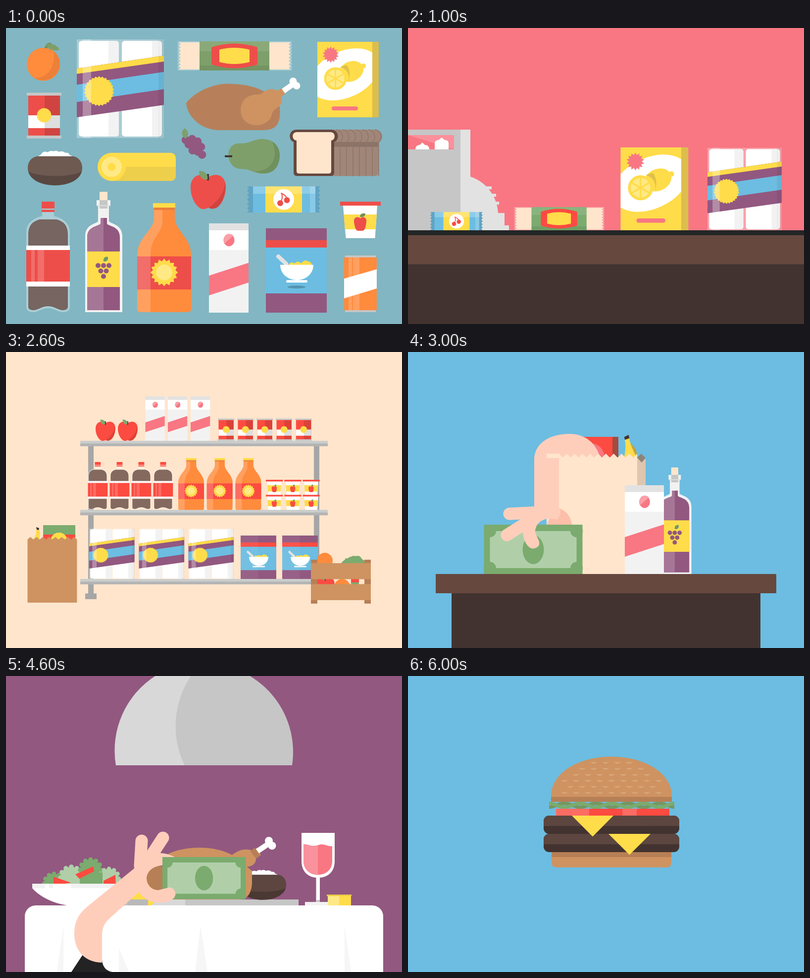
These frames come from a looping animation (800 px wide and 600 px high, 7000 ms). An HTML page:

```html
<!DOCTYPE html>
<html lang="en">
<head>
<meta charset="utf-8">
<style>
html, body { margin: 0; width: 100%; height: 100%; overflow: hidden; }
svg { display: block; width: 800px; height: 600px; }
svg > g { --r: #fc4b41; --g: #7bab6e; --c: #84695f; --p: #5c463f; --t: #ce9361; display: none; }
svg > g:first-child { --r: #ee4e49; --g: #7e9f69; --c: #766560; --p: #6f5a51; --t: #b7805a; }
</style>
</head>
<body>
<svg viewBox="0 0 800 600"></svg>
<script>
const red = 'var(--r)', green = 'var(--g)', white = '#fff', pale = '#f2f2f2', light = '#e2e2e2',
  gray = '#c6c6c6', steel = '#b4b4b4', post = '#a6a6a6', cream = '#ffe5cc', yellow = '#ffdc4a',
  lemon = '#ffe985', orange = '#ff8b3d', purple = '#925880', pink = '#f87783', blue = '#6cbde1',
  tan = '#ce9361', bark = '#b77f55', brown = '#66483f', cocoa = '#5c463f', dark = '#423330',
  skin = '#ffcebb', shade = 'rgba(0,0,0,.13)', glow = 'rgba(255,255,255,.18)', film = 'rgba(255,255,255,.3)';

const rect = (x, y, w, h, f, r = 0) =>
  `<rect x="${x}" y="${y}" width="${w}" height="${h}" rx="${r}" fill="${f}"/>`;
const disc = (x, y, r, f, ry = r, turn = 0) =>
  `<ellipse cx="${x}" cy="${y}" rx="${r}" ry="${ry}" fill="${f}" transform="rotate(${turn} ${x} ${y})"/>`;
const path = (d, f) => `<path d="${d}" fill="${f}"/>`;
const line = (d, c, w, cap = 'round') =>
  `<path d="${d}" fill="none" stroke="${c}" stroke-width="${w}" stroke-linecap="${cap}"/>`;
const list = (n, f) => Array.from({ length: n }, (_, i) => f(i)).join('');
const star = (x, y, R, r, n, f) => path('M' + Array.from({ length: 2 * n }, (_, i) => {
  const a = i * Math.PI / n, q = i % 2 ? r : R;
  return (x + q * Math.sin(a)).toFixed(1) + ' ' + (y - q * Math.cos(a)).toFixed(1);
}).join('L') + 'Z', f);
// Zigzag starting at the current point, n teeth of the given vector plus a notch.
const zig = (n, dx, dy, nx, ny) => list(n, () => `l${dx / 2 + nx} ${dy / 2 + ny}l${dx / 2 - nx} ${dy / 2 - ny}`);
const ruffle = (x, y, R, f) => disc(x, y, R, f) +
  list(12, i => disc(x + R * Math.cos(i * Math.PI / 6), y + R * Math.sin(i * Math.PI / 6), R * .22, f));
const grapes = (x, y, r, dx, dy) => [3, 2, 1].map((n, row) =>
  list(n, i => disc(x + (i - (n - 1) / 2) * dx, y + row * dy, r, purple))).join('');

const appleShape = 'M408 303C395 292 373 298 373 323C373 348 388 367 398 367C404 367 406 365 409 364C412 366 415 367 420 366C432 365 444 345 444 322C444 298 424 292 408 303Z';
const apple = path(appleShape, red) +
  path('M443 312C446 340 432 366 420 366C415 367 412 366 410 364C426 352 440 338 443 312Z', shade) +
  rect(406, 296, 4, 13, dark) + path('M390 290C402 289 409 296 407 307C396 309 390 301 390 290Z', green);

const cereal = (mid, end) => rect(525, 406, 123, end - 406, purple) + rect(525, 430, 123, 15, red) +
  rect(525, 445, 123, mid - 445, blue) +
  disc(587, mid - 13, 18, 'rgba(0,0,0,.22)', 3) +
  line('M550 463L566 478', light, 8) +
  path('M570 481Q575 472 583 477Q590 470 596 477Q604 468 610 473Q617 473 618 481Z', yellow) +
  path('M554 480H621C621 498 606 511 588 511C569 511 554 498 554 480Z', white) +
  rect(566, 511, 43, 5, white, 2.5);

// Each item: left, top, drawing.
const items = {
  orange: [42, 30, disc(75.5, 73.5, 33.5, orange) +
    path('M96 47C101 80 85 100 58 102C82 114 109 97 109 73C109 62 104 53 96 47Z', '#ec8038') +
    path('M78 41C79 33 86 28 92 31C90 38 86 42 78 41Z', '#6f9060') +
    path('M80 34C92 30 104 34 108 44C96 48 86 44 80 34Z', green)],
  towels: [143, 23, rect(143, 23, 176, 200, film) + rect(147, 26, 81, 194, white, 6) +
    path('M207 26H222Q228 26 228 32V214Q228 220 222 220H207Z', pale) +
    rect(234, 26, 81, 194, white, 6) + rect(295, 26, 14, 194, pale) +
    path('M143 82L319 56V156L143 181Z', purple) + path('M143 82L319 56V68L143 93Z', yellow) +
    path('M143 115L319 89V124L143 150Z', blue) + rect(308, 23, 11, 200, 'rgba(0,0,0,.06)') +
    star(188, 128, 30.5, 27.5, 26, yellow) + rect(155, 23, 17, 200, film)],
  wrapper: [346, 27, path('M346 27H578' + zig(9, 0, 6.55, -2, 0) + 'H346' + zig(9, 0, -6.55, 2, 0) + 'Z', film) +
    path('M349 29H575' + zig(8, 0, 6.875, -4, 0) + 'H349' + zig(8, 0, -6.875, 4, 0) + 'Z', cream) +
    rect(391, 27, 141, 59, green) + rect(391, 27, 141, 20, 'rgba(255,255,255,.1)') +
    rect(391, 76, 141, 10, 'rgba(0,0,0,.07)') +
    path('M415 39Q461 24 508 39V74Q461 89 415 74Z', red) +
    path('M431 44Q461 36 492 44V69Q461 77 431 69Z', yellow)],
  lemonBox: [629, 28, rect(629, 28, 111, 153, yellow) + rect(740, 28, 13, 153, '#dcbe4c') +
    '<clipPath id="face"><path d="M629 28h111v153h-111z"/></clipPath><g clip-path="url(#face)">' +
    disc(684, 94, 74, white, 47, -25) + '</g>' +
    disc(697, 88, 26, yellow, 20, -25) + disc(722, 77, 5, yellow) + line('M708 82L720 78', yellow, 9) +
    path('M675 79C694 84 699 106 684 117C698 107 696 84 688 75Z', '#dfc04b') +
    disc(665.5, 102.5, 23, yellow) + disc(665.5, 102.5, 18, lemon) +
    list(3, i => `<g transform="rotate(${i * 60} 665.5 102.5)">${rect(664, 84, 3, 37, yellow)}</g>`) +
    star(656, 54, 16.5, 12, 14, pink) + rect(658, 159, 53, 8, pink, 4)],
  can: [42, 131, rect(45, 137, 64, 81, red) + rect(45, 177, 64, 26, white) + rect(78, 137, 31, 81, shade) +
    rect(42, 131, 70, 6, gray) + rect(42, 218, 70, 6, gray) + disc(77, 177, 14.5, yellow)],
  turkey: [364, 100, path('M364 152C385 125 425 112 450 113C490 114 510 121 532 135L553 160C556 195 545 207 520 207H430C395 207 366 180 364 152Z', 'var(--t)') +
    line('M560 128L584 111', white, 11, 'butt') + disc(580, 108, 7.5, white) + disc(587, 117, 7.5, white) +
    path('M474 167C474 145 490 135 506 135C520 135 522 124 537 124C542 124 546 126 549 127L556 122L564 133L557 139V150C555 160 541 163 538 172C535 190 520 197 506 197C487 197 474 184 474 167Z', tan)],
  grapes: [355, 203, [[363, 227], [376, 225], [387, 230], [369, 236], [381, 238], [394, 241], [377, 248], [388, 251], [396, 257]]
    .map(([x, y]) => disc(x, y, 8.3, purple)).join('') +
    path('M361 203C370 210 370 218 363 224C353 219 354 209 361 203Z', green)],
  pear: [442, 225, path('M450 262C447 240 462 232 476 234C492 234 500 225 518 225C540 225 553 240 553 258C553 280 540 295 518 295C500 295 495 286 478 286C460 286 452 275 450 262Z', green) +
    path('M538 230C552 265 535 290 503 291C540 304 553 280 553 258C553 246 547 236 538 230Z', '#70915f') +
    rect(442, 258, 15, 4, '#413532')],
  bread: [574, 206, path('M655 206H745C764 206 763 230 752 231V293Q752 300 745 300H655Z', '#a08679') +
    rect(660, 231, 92, 10, '#8c7368') +
    list(7, i => line(`M${668 + i * 13} 206c15 3 14 22 7 25V300`, '#907669', 1.6)) +
    path('M587 206H656C674 206 674 228 663 231V293Q663 300 656 300H588Q581 300 581 293V231C570 228 570 206 587 206Z', brown) +
    path('M588 211H655C667 211 666 227 657 228V290Q657 295 652 295H592Q587 295 587 290V228C577 227 576 211 588 211Z', cream)],
  potato: [44, 248, path('M44 284C44 268 55 260 66 260H133C145 260 154 270 154 284C154 305 130 319 99 319C68 319 44 305 44 284Z', 'var(--p)') +
    path('M45 291C70 303 130 303 153 291C149 308 127 319 99 319C71 319 49 308 45 291Z', 'rgba(0,0,0,.2)') +
    path('M65 260C69 257 71 257 74 252Q80 249 84 252Q90 247 96 250Q101 247 107 251Q114 248 120 253Q127 252 128 257L134 260Z', white)],
  roll: [185, 253, path('M213 253H331Q343 253 343 265V298Q343 310 331 310H213Z', yellow) +
    path('M213 281.5H343V298Q343 310 331 310H213Z', '#eecf4c') + disc(213.5, 281.5, 28.5, yellow) +
    disc(213.5, 281.5, 20.5, lemon) + disc(213.5, 281.5, 8, yellow)],
  apple: [373, 290, apple],
  bar: [487, 321, path('M500 321L487 321' + zig(6, 0, 8.83, 4, 0) + 'L500 374Z', '#61a3c3') +
    path('M623 321H635' + zig(6, 0, 8.83, -4, 0) + 'H623Z', '#61a3c3') +
    rect(499, 321, 126, 53, blue) + rect(524, 321, 74, 53, yellow) + rect(499, 321, 126, 15, 'rgba(255,255,255,.22)') +
    rect(614, 321, 11, 53, glow) + disc(561, 347.5, 21, white) +
    line('M556 335C566 339 568 344 568 349M557 336C560 344 557 350 554 355', red, 2) +
    disc(554, 355, 6, red) + disc(567.5, 349, 6, red)],
  yogurt: [675, 352, path('M681 360H750L745.5 426H686.5Z', white) + path('M682.4 378H748.8L746.6 408H684.7Z', yellow) +
    rect(675, 352, 82, 8, red) +
    path('M716 386C710 380 702 384 703 393C704 400 706 411 711 411H720C726 411 727 400 728 393C729 384 721 380 716 386Z', red) +
    path('M715 383C715 376 721 375 726 376C726 382 721 384 715 383Z', '#6f9060')],
  cola: [41, 352, rect(72, 352, 26, 14, red) + rect(72, 366, 26, 2.5, film) + rect(72, 368.5, 26, 4.5, red) +
    path('M73 373H97V381C115 386 129 395 129 415V565C129 572 124 576 116 576C104 576 98 568 85 568C72 568 66 576 54 576C46 576 41 572 41 565V415C41 395 55 386 73 381Z', 'rgba(255,255,255,.33)') +
    path('M68 388H102C118 392 125 402 125 418V565C125 570 120 572 115 572C105 572 98 564 85 564C72 564 65 572 55 572C50 572 45 570 45 565V418C45 402 52 392 68 388Z', 'var(--c)') +
    rect(41, 441, 88, 83, white) + rect(41, 450, 88, 64, red) + rect(51, 450, 7, 64, glow) + rect(64, 450, 13, 64, glow)],
  wine: [160, 332, path('M186 358H208V391C208 397 235 396 235 422V576H160V422C160 396 186 397 186 391Z', pale) +
    rect(183, 349, 28, 10, pale) + rect(189, 332, 16, 17, cream) + rect(189, 349, 16, 17, gray) + rect(183, 359, 28, 2, '#dedede') +
    path('M191 385H204V396C204 402 230 400 230 424V572H164V424C164 400 191 402 191 396Z', purple) +
    path('M191 385H197V572H164V424C164 400 191 402 191 396Z', '#a67696') +
    rect(164, 453, 66, 72, yellow) + grapes(197, 481.5, 5, 11, 11) +
    path('M197 473C196 465 201 463 206 464C207 471 203 474 197 473Z', '#6f9a6a')],
  juice: [265, 355, path('M299 364H341V385C341 410 374 425 374 460V569Q374 576 367 576H272Q265 576 265 569V460C265 425 299 410 299 385Z', orange) +
    rect(299, 364, 42, 5, '#eb8038') + rect(297, 355, 45, 9, yellow) + rect(265, 463, 109, 67, red) +
    path('M299 369H316V395C312 420 292 425 292 462V576H272Q265 576 265 569V460C265 425 299 410 299 385Z', glow) +
    star(319.5, 495.5, 28, 23, 16, yellow) + disc(319.5, 495.5, 16, lemon)],
  carton: [410, 396, rect(410, 396, 80, 181, pale) + rect(410, 396, 80, 14, light) + rect(410, 410, 80, 40, white) +
    path('M410 502L490 476V516L410 542Z', pink) + disc(450.5, 430, 11, pink, 12.5) +
    path('M441 437C437 425 444 417 451 417.5C455 417.5 458 419 459 421Z', '#faa0a8')],
  cereal: [525, 406, cereal(538, 577)],
  soda: [683, 461, rect(685, 461, 62, 115, gray) + rect(683, 465, 66, 107, orange) + rect(692, 465, 7, 107, glow) +
    rect(701, 465, 13, 107, glow) + path('M683 508L749 489V528L683 548Z', white)],
};

const put = (name, x, y, k = 1, ky = k, art = items[name][2]) => {
  const [left, top] = items[name];
  return `<g transform="translate(${x} ${y}) scale(${k} ${ky}) translate(${-left} ${-top})">${art}</g>`;
};
const row = (xs, name, y, k, ky, art) => xs.map(x => put(name, x, y, k, ky, art)).join('');

const bill = (x, y, k) => `<g transform="translate(${x} ${y}) scale(${k})">` + rect(0, 0, 199, 101, green) +
  rect(12, 13, 175, 75, '#b0cfa9') +
  [[12, 13], [187, 13], [12, 88], [187, 88]].map(([a, b]) => disc(a, b, 12.5, green)).join('') +
  disc(99.5, 50.5, 21.5, green, 29.5) + '</g>';

const shelf = y => rect(150, y, 500, 6, '#cacdcc') + rect(150, y + 5.5, 500, 5.5, steel);
const hanger = x => line(`M${x - 25} 114A12.7 12.7 0 0 1 ${x} 117V144L${x - 50} 179.5H${x + 50}L${x} 144`, steel, 4.5);

const counter = () => rect(0, 206, 106, 204, gray) + disc(100, 379, 82, light) + rect(0, 206, 106, 204, gray) +
  rect(106, 206, 20, 204, light) +
  rect(158, 321, 11, 6, light) + rect(166, 336, 12, 6, light) + rect(173, 352, 11, 6, light) +
  rect(126, 375, 69, 35, light) + rect(195, 400, 9, 10, light) +
  rect(0, 217, 93, 29, pink) + path('M0 217H93V246Z', '#fa909b') +
  path('M15 246C15 239 20 237 24 237L29 232L34 237C39 237 43 240 43 246Z', white) +
  path('M54 246V234C54 229 58 227 62 227L68 222L74 227C79 227 82 229 82 234V246Z', white) +
  put('bar', 45, 373, .716, .705) + put('wrapper', 214, 363, .789, .797) +
  put('lemonBox', 429.5, 242, 1.104, 1.099) + put('towels', 605, 243, .852, .838) +
  rect(0, 410, 800, 10, '#232626') + rect(0, 420, 800, 59, brown) + rect(0, 479, 800, 121, dark);

const shop = () => rect(166, 190, 11, 300, post) + rect(160, 489.5, 23, 11.5, post) + rect(622, 190, 11, 275, post) +
  [180, 320, 460].map(shelf).join('') +
  row([181, 226], 'apple', 137, .563, .56) + row([281.5, 327, 373], 'carton', 90, .49, .497) +
  row([428, 467, 506, 545, 584.5], 'can', 135, .477, .482) +
  row([165.5, 209.5, 253.5, 297.5], 'cola', 223, .453, .433) +
  row([348, 405.7, 463.5], 'juice', 215, .477, .475) +
  row([525, 562.3, 599.5], 'yogurt', 259, .418, .425) + row([525, 562.3, 599.5], 'yogurt', 289.5, .418, .412) +
  row([168, 268.5, 368.5], 'towels', 358, .521, .512) +
  row([474, 558], 'cereal', 372, .585, .585, cereal(526, 556.5) + rect(525, 406, 61, 150.5, 'rgba(255,255,255,.05)')) +
  path('M61 361L67 359C69 366 69 374 67 382H53C59 375 62 368 61 361Z', yellow) + path('M61 355L67 357L66 361L62 360Z', dark) +
  rect(75, 351, 65, 19, green) + rect(75, 370, 65, 15, red) + disc(107, 383, 17, yellow) +
  path('M43.5 380l5.5-5' + zig(7, 12.7, 0, 0, 5) + 'l5.5 5V508H43.5Z', tan) +
  disc(644, 423, 16, orange) +
  path('M677 429C680 422 684 424 686 418C692 420 692 415 697 415C702 411 706 415 711 413C718 414 717 419 721 421C727 424 722 426 728 429Z', green) +
  '<clipPath id="slot"><path d="M629 459h95v13h-95z"/></clipPath><g clip-path="url(#slot)">' +
  put('apple', 626, 453, .53) + disc(679, 476, 16, orange) + rect(697, 460, 16, 7, red) + rect(697, 467, 16, 6, green) + '</g>' +
  rect(616, 421, 13, 89, bark) + rect(724, 421, 13, 89, bark) +
  rect(616, 428, 121, 32.5, tan) + rect(616, 470.5, 121, 32.5, tan);

const pay = () => rect(340, 172, 73, 50, red) + rect(413, 172, 12, 50, '#a34b3e') + disc(369, 213, 28, pink) +
  path('M450 186C459 192 463 202 463 214H452Z', '#c3a143') +
  path('M438 177L447 175C449 190 458 203 462 216H436C440 200 440 190 438 177Z', yellow) + path('M437 172L446 168L447 175L438 178Z', dark) +
  path('M255 330V218C255 188 282 166 326 166C358 166 380 184 389 216H305V330Z', skin) +
  rect(463, 215, 17, 235, '#dec6b0') + path('M463 214L471 206L480 215L472 224Z', '#8b8479') +
  path('M280 450V206H305' + zig(10, 15.8, 0, 0, 8) + 'V450Z', cream) +
  path('M285 338L305 317C320 321 331 336 331 353H280Z', '#fdbfa9') +
  put('carton', 438, 270, .9875, .994) + put('wine', 506, 234, .888, .886) + put('carton', 438, 270, .9875, .994) +
  bill(153.5, 350, 1) +
  path('M255 215H305V317C310 321 309 331 301 340C276 332 256 346 257 366L264 382C268 392 262 398 252 398.5C240 397 233 380 232 366L240 345L226 340L255 315Z', skin) +
  line('M205 328L268 325', skin, 25) + line('M200 371L252 338', skin, 25) +
  rect(56, 450, 688, 39, brown) + rect(88, 489, 624, 111, dark);

const dinner = () => path('M222 181A180 180 0 1 1 578 181Z', gray) +
  path('M222 181A180 180 0 0 1 303 -1H374C337 55 333 125 361 181Z', '#d8d8d8') +
  ruffle(97, 421, 20, green) + ruffle(132, 409, 22, '#b0cfa9') + path('M96 407L132 419L96 424Z', red) +
  ruffle(171, 393, 21, green) + ruffle(208, 411, 20, '#b0cfa9') + rect(149, 398, 46, 24, green) +
  path('M140 402L176 386L178 396L148 411Z', red) + path('M197 415L221 403L222 424H197Z', red) +
  path('M53 430C70 450 105 466 145 467H235V421H53Z', white) + rect(53, 421, 182, 9, pale) +
  rect(79, 421, 8, 9, white) + rect(95, 421, 36, 9, white) +
  rect(240, 453, 351, 12, gray) + rect(287, 453, 75, 12, '#d8d8d8') + disc(275, 440, 31, yellow) + rect(245, 453, 42, 12, '#b9b9b9') +
  put('potato', 471, 392.5, .864, .864) +
  path('M315 368C335 354 362 348 390 348C420 348 440 354 457 363L497 395V420C496 440 488 453 470 453H320Z', tan) +
  path('M455 364C470 352 485 348 500 355L507 348L515 363L505 370C505 385 490 390 470 385Z', tan) +
  path('M494 356L502 348L514 364L505 370Z', bark) +
  line('M508 355L532 339', white, 11, 'butt') + disc(531, 334, 8, white) + disc(537.5, 344, 8, white) +
  disc(309, 410, 25, bark) +
  rect(38, 465, 724, 160, white, 22) +
  path('M116 506V600H103ZM393 506L407 600H382ZM228 552L249 600H228ZM684 506L697 600H684Z', '#f6f6f6') +
  path('M597 318H664V375C664 399 648 409 630 409C612 409 597 398 597 375Z', white) + rect(626.5, 405, 7.5, 54, white) +
  rect(626.5, 454, 7.5, 5, gray) + rect(604, 458, 52, 7, pale) +
  path('M601 341C612 341 616 347 630 343C642 338 648 346 659 345V375C659 394 645 403 630 403C615 403 601 393 601 375Z', pink) +
  path('M601 341C612 341 616 347 630 343V403C615 403 601 393 601 375Z', '#f9929d') +
  rect(650, 443, 47, 22, yellow) + rect(650, 446, 23, 19, lemon) + rect(648, 443, 50, 3, '#ecca45') +
  line('M290 371C307 367 325 368 340 378', skin, 20) + bill(316, 367, .845) +
  path('M155 565L132 600H215Q196 597 194 576Z', '#232323') +
  path('M194 581C155 580 138 553 138 522C138 497 148 480 166 466L259 390L262 366L286 356L306 362L316 368V384C298 385 284 395 284 412C285 425 295 434 308 434L330 428.5A13 13 0 0 1 337 452C320 464 287 464 268 438L214 487C201 498 194 508 194 525Z', skin) +
  line('M274 334L271 384', skin, 25) + line('M317 328L291 368', skin, 25);

const clip = x => rect(x, 173, 8, 18, gray);
const belt = (y, h, parts) => parts.map(([x, w]) => rect(x, y, w, h, cocoa)).join('');
const rack = () => rect(665, 127, 13, 358, post) + rect(657, 483, 29, 14, post) +
  rect(102, 113, 596, 7, '#cbcccb') + rect(102, 120, 596, 7, steel) +
  hanger(627.5) + path('M576 187H679V435H633V277H622V435H576Z', tan) + rect(574, 421, 50, 14, tan) + rect(631, 421, 50, 14, tan) +
  rect(610, 193, 29, 14, pale) + belt(193, 13, [[639, 10], [653, 17], [674, 8]]) + clip(652) +
  hanger(540) + path('M505 157C480 157 461 172 460 192V211H492V333H589V211H620V179Q600 165 575 157C565 180 515 180 505 157Z', white) +
  rect(492, 324, 97, 9, red) + path('M505 156H517C524 174 556 174 563 156H575C563 186 517 186 505 156Z', red) +
  hanger(453) + rect(418, 157, 10.5, 50, pink) + rect(477, 157, 10.5, 50, pink) +
  path('M411 204C425 188 440 190 453 200C465 186 485 186 497 203L486 285L503 434H402L420 285L411 220Z', pink) +
  list(6, i => disc(410.7 + i * 16.7, 434, 8.8, pink)) + rect(420, 280, 66, 11.5, yellow) +
  path('M331 164H318C300 166 289 175 289 190V220H319V317H412V220H443V190C443 175 430 164 400 164Z', green) +
  rect(412, 211, 31, 9, dark) + path('M342 156H388L400 165L365 190L330 165Z', dark) + path('M350 165H380L365 177Z', '#56784f') +
  hanger(365.5) + path('M330 165L342 157L350 165L365 178L380 165L388 157L400 165L365 190Z', dark) +
  path('M330 166L365 190L400 166L412 170V185H319V170Z', green) + path('M330 165L343 160L365 178L388 160L400 165L365 190Z', dark) +
  hanger(278) + path('M227 187H329V435H284V278A6 6 0 0 0 272 278V435H227Z', blue) +
  belt(193, 11, [[250, 11], [266, 24], [295, 24], [324, 5]]) + rect(232, 211, 6, 8, dark) + clip(302) +
  rect(175, 175, 31, 143, white) + path('M175 153Q190 165 206 153V186Q190 192 175 186Z', '#724a60') + hanger(190.5) +
  path('M135 169L175 152V325H148V206H144V336H119L121 190Q123 178 135 169ZM206 152L242 167Q260 177 260 190L262 336H237V206H233V325H206Z', purple) +
  rect(122, 127, 14, 358, post) + rect(115, 484, 28, 13, post);

const wave = sign => 'M' + Array.from({ length: 65 }, (_, i) => {
  const x = 284 + i * 4;
  return x + ' ' + (262 + sign * 4 * Math.cos((x - 284) * Math.PI / 32)).toFixed(1);
}).join('L');
const patty = y => rect(274, y, 274, 37, dark, 11) +
  path(`M274 ${y + 21}V${y + 11}a11 11 0 0 1 11-11H537a11 11 0 0 1 11 11V${y + 21}Z`, cocoa);
const burger = () => path('M289 255V240C292 195 345 163.5 411 163.5C477 163.5 530 195 533 240V255Z', tan) +
  [4, 6, 7, 9, 8, 9].map((n, j) => list(n, i =>
    path(`M${404 + (i - (n - 1) / 2) * 23.8} ${174.5 + j * 12.2}h14q-7 7 -14 0Z`, '#d8a678'))).join('') +
  rect(289, 245, 244, 10, bark) +
  '<clipPath id="leaf"><path d="M285 255h253v14h-253z"/></clipPath><g clip-path="url(#leaf)">' +
  line(wave(1), '#759762', 7) + line(wave(-1), green, 7) + '</g>' +
  rect(299, 269, 229, 14, red) + rect(299, 269, 67, 14, glow) + rect(433, 269, 29, 14, glow) +
  path('M290 357H532V378Q532 388 522 388H300Q290 388 290 378Z', tan) + rect(290, 357, 242, 10, bark) +
  patty(283) + patty(320) + path('M331 283H415L373 325.5ZM405 320H490L447.5 362.5Z', yellow);

const scenes = [
  ['#82b6c2', Object.values(items).map(i => i[2]).join('')],
  [pink, counter()], [cream, shop()], [blue, pay()], [purple, dinner()], [cream, rack()], [blue, burger()],
];
const svg = document.querySelector('svg');
svg.innerHTML = scenes.map(([bg, art]) => `<g>${rect(0, 0, 800, 600, bg)}${art}</g>`).join('');

const HOLD = 1000, start = performance.now();
function show() {
  const now = Math.floor((performance.now() - start) / HOLD) % scenes.length;
  [...svg.children].forEach((g, i) => { g.style.display = i === now ? 'inline' : 'none'; });
  requestAnimationFrame(show);
}
show();
</script>
</body>
</html>
```
